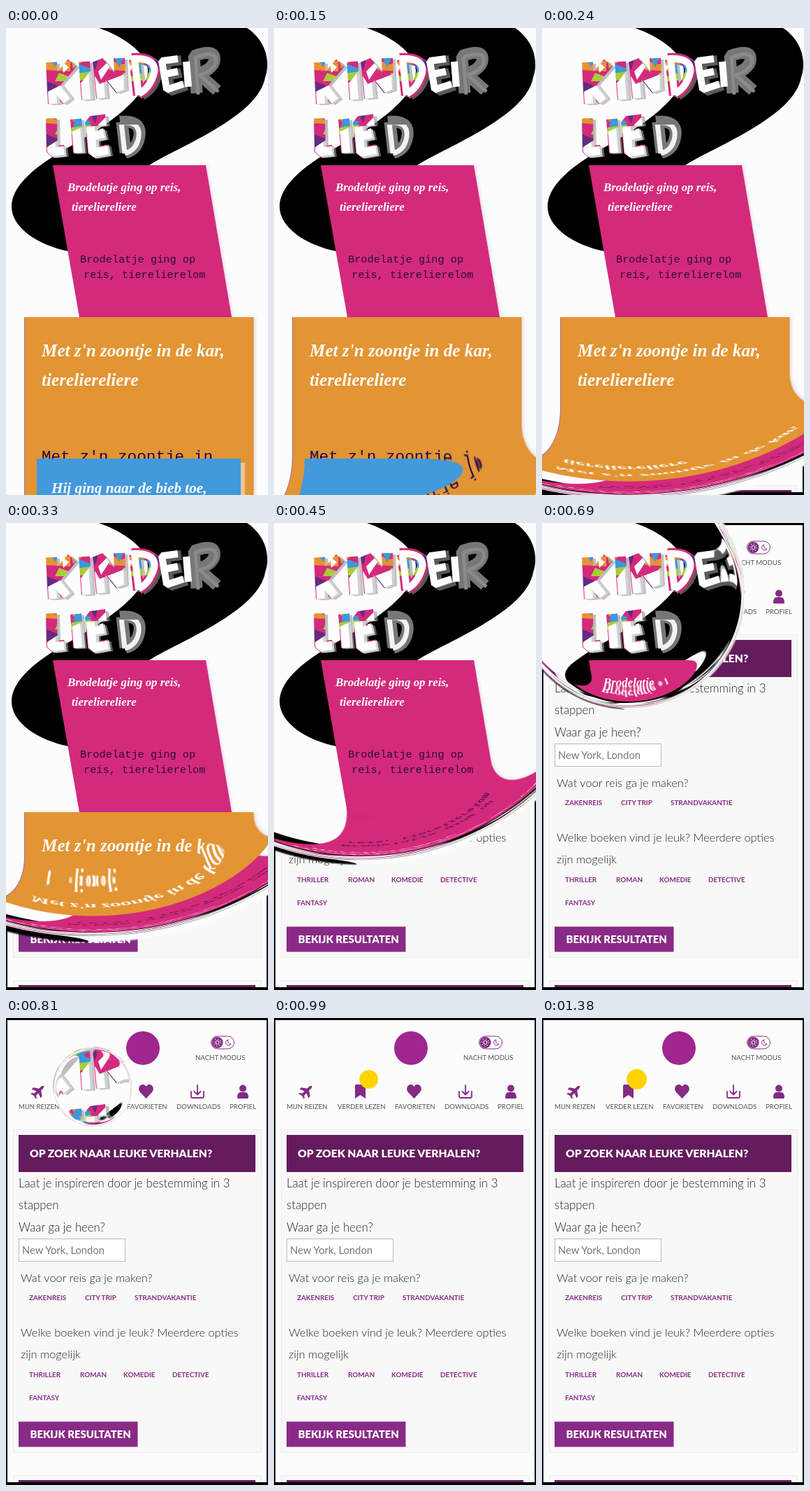
Write an HTML page with a canvas that moves like this. It is 375 by 667 pixels and loops after 8 s.

```html
<!DOCTYPE html>
<html lang="nl">
<head>
<meta charset="utf-8">
<title>Leuke verhalen</title>
<style>
html, body { margin: 0; width: 100%; height: 100%; overflow: hidden; background: #fcfcfc; }
svg, canvas { position: absolute; left: 0; top: 0; width: 375px; height: 667px; }
text { font-family: Lato, sans-serif; fill: #222; }
.body { font-size: 16.4px; font-weight: 300; }
.intro { font-size: 16.8px; font-weight: 300; }
.nav { font-size: 9.6px; fill: #555; }
.tag { font-size: 9.9px; font-weight: 700; fill: #892a86; }
.bold { font-weight: 900; fill: #fff; }
.icon { fill: #842b83; }
.line { fill: none; stroke: #842b83; stroke-width: 1.8; stroke-linecap: round; stroke-linejoin: round; }
</style>
</head>
<body>
<svg viewBox="0 0 375 667">
  <path d="M0 0H375V667H0Z"/>
  <path fill="#fcfcfc" d="M2 3H373V663H2Z"/>

  <circle cx="196" cy="43" r="24" fill="#a0268f"/>
  <rect x="293.5" y="26" width="33" height="18" rx="9" fill="#fff" stroke="#842b83"/>
  <circle class="icon" cx="302.5" cy="35" r="8"/>
  <circle cx="302.5" cy="35" r="2.5" fill="none" stroke="#fff"/>
  <circle cx="302.5" cy="35" r="4.8" fill="none" stroke="#fff" stroke-width="1.5" stroke-dasharray="1 2.77"/>
  <path d="M318 31A4 4 0 1 0 322 37A4 4 0 0 1 318 31Z" fill="none" stroke="#842b83"/>
  <text class="nav" x="271" y="60">NACHT MODUS</text>

  <path class="icon" transform="translate(46 105) rotate(-45)" d="M11 0Q11 -2 8 -2H4L-1 -9H-4L-1.5 -2H-6L-8 -5H-10L-8.5 0L-10 5H-8L-6 2H-1.5L-4 9H-1L4 2H8Q11 2 11 0Z"/>
  <path class="icon" d="M116 97Q116 95 118 95H129Q131 95 131 97V115L123.5 110L116 115Z"/>
  <path class="icon" d="M200.5 115L192 106C188 101 191 95 196 95Q199 95 200.5 98Q202 95 205 95C210 95 213 101 209 106Z"/>
  <path class="line" d="M265 105V112Q265 114 267 114H281Q283 114 283 112V105M274 96V109M269.5 105L274 109.5L278.5 105"/>
  <circle class="icon" cx="339" cy="100.5" r="5"/>
  <path class="icon" d="M331 114Q331 106 336 106H342Q347 106 347 114Q347 115 345 115H333Q331 115 331 114Z"/>
  <text class="nav" x="18" y="130">MIJN REIZEN</text>
  <text class="nav" x="91" y="130">VERDER LEZEN</text>
  <text class="nav" x="173" y="130">FAVORIETEN</text>
  <text class="nav" x="244" y="130">DOWNLOADS</text>
  <text class="nav" x="320" y="130">PROFIEL</text>
  <circle id="badge" cx="135.7" cy="87.5" r="0" fill="#fed400"/>

  <g fill="#f8f8f8" stroke="#ebebeb">
    <rect x="10.5" y="159.5" width="355" height="461"/>
    <path d="M10.5 663V653.5H365.5V663"/>
  </g>
  <path fill="#641b5d" d="M18 167H357V220H18ZM18 660H357V663H18Z"/>
  <text class="bold" x="34" y="198.5" font-size="15.6">OP ZOEK NAAR LEUKE VERHALEN?</text>
  <text class="intro" x="18" y="242">Laat je inspireren door je bestemming in 3</text>
  <text class="intro" x="18" y="273">stappen</text>
  <text class="intro" x="18" y="305">Waar ga je heen?</text>
  <rect x="18.5" y="315.5" width="152" height="32" fill="#fff" stroke="#bbb"/>
  <text x="23" y="336.5" font-size="14.8" style="fill:#777">New York, London</text>
  <text class="body" x="21" y="377">Wat voor reis ga je maken?</text>
  <text class="tag" x="33" y="402.5">ZAKENREIS</text>
  <text class="tag" x="113" y="402.5">CITY TRIP</text>
  <text class="tag" x="184" y="402.5">STRANDVAKANTIE</text>
  <text class="body" x="21" y="454.5">Welke boeken vind je leuk? Meerdere opties</text>
  <text class="body" x="21" y="486">zijn mogelijk</text>
  <text class="tag" x="33" y="513">THRILLER</text>
  <text class="tag" x="106" y="513">ROMAN</text>
  <text class="tag" x="168" y="513">KOMEDIE</text>
  <text class="tag" x="238" y="513">DETECTIVE</text>
  <text class="tag" x="33" y="546">FANTASY</text>
  <path fill="#892a86" d="M18 576.5H188.5V612.5H18Z"/>
  <text class="bold" x="34.5" y="599.5" font-size="14.8">BEKIJK RESULTATEN</text>
</svg>
<canvas id="lens" width="375" height="667"></canvas>

<script>
const W = 375, H = 667, LOOP = 8000, STEP = 30;
const CX = 124, CY = 98;       // the lens closes on the bookmark
const R0 = 806, SPEED = 0.925; // start radius, px per ms
const FLAT = 0.78;             // undistorted share of the radius

function makeCanvas(w, h) {
  const c = Object.assign(document.createElement('canvas'), { width: w, height: h });
  return c.getContext('2d', { willReadFrequently: true });
}

function fill(g, color, d) {
  g.fillStyle = color;
  g.fill(new Path2D(d));
}

function stroke(g, style, width, d, dx = 0, dy = 0) {
  g.save();
  g.translate(dx, dy);
  g.strokeStyle = style;
  g.lineWidth = width;
  g.stroke(new Path2D(d));
  g.restore();
}

function paperCut(g) {
  const p = makeCanvas(92, 76);
  fill(p, '#d42a7c', 'M0 0H92V76H0Z');
  fill(p, '#e8922f', 'M52 44L74 52L92 46V62L56 60ZM0 40L20 46L4 58Z');
  fill(p, '#3d97dc', 'M62 40H78L70 56ZM8 50L30 58L24 70L4 64Z');
  fill(p, '#a9cc3a', 'M2 66L30 62L26 74L0 76ZM76 64L92 70V76H70Z');
  fill(p, '#672a82', 'M58 0L74 6L68 22L54 16ZM28 46L40 44L36 60Z');
  fill(p, '#fff', 'M40 62L54 48L58 53L44 74ZM80 48L90 56L82 64Z');
  return g.createPattern(p.canvas, 'repeat');
}

function drawTitle(g) {
  const K = 'M65 49L68 108M95 50L69 80L88 104', I = 'M112 48L116 102';
  const N = 'M137 100L132 48L164 88L162 43';
  const D = 'M184 45L190 96M180 44Q216 42 212 64Q206 86 190 94';
  const E = 'M246 44L223 47L230 88L254 80M227 66L246 62', I2 = 'M258 48L261 84';
  const R = 'M273 93L269 40Q302 28 298 48Q294 60 275 65L302 89';
  const low = 'M65 129L66 177L84 175M100 130L104 178' +
    'M143 131L121 134L125 178L147 174M123 155L141 151';
  const D2 = 'M166 134L171 178M163 134Q194 131 191 154Q188 174 171 178';
  const paint = K + I + N + low;
  g.lineJoin = 'bevel';
  stroke(g, 'rgba(150,150,150,.6)', 14, K + I + N + D + E + low, 5, 2);
  stroke(g, '#777', 17, R + D2);
  stroke(g, '#8a8a8a', 5, R, 2, 2);
  stroke(g, paperCut(g), 16, paint + D);
  g.save();
  g.clip(new Path2D('M50 96L86 78L108 78L122 60L134 80L170 66L178 30H275V120H50ZM50 176L90 150L108 142L150 138H205V195H50Z'));
  stroke(g, '#d0d0d0', 15, paint, 2, 1);
  stroke(g, '#fff', 12, paint, -1);
  stroke(g, '#fff', 10, D + E + I2);
  stroke(g, '#f2f2f2', 7, D2, -1, 1);
  g.restore();
}

function card(g, color, d) {
  g.save();
  g.shadowColor = 'rgba(60,30,80,.13)';
  g.shadowBlur = 4;
  g.shadowOffsetX = 2;
  fill(g, color, d);
  g.restore();
}

function write(g, font, color, lines) {
  g.font = font;
  g.fillStyle = color;
  for (const [s, x, y] of lines) g.fillText(s, x, y);
}

function drawCover() {
  const g = makeCanvas(W, H);
  const script = px => `italic bold ${px}px "Liberation Serif", serif`;
  const mono = px => `${px}px "Liberation Mono", monospace`;
  fill(g, '#fcfcfc', 'M0 0H375V667H0Z');
  fill(g, '#000', 'M133 0C168 12 202 36 203 60C204 104 132 146 78 177C36 202 8 228 8 255' +
    'C8 285 45 310 90 319L150 300L205 196C250 168 362 126 371 70C379 48 372 18 345 0Z');
  drawTitle(g);

  card(g, '#d42a7c', 'M67 196H286L323 413H105Z');
  write(g, script(16.9), '#fff', [['Brodelatje ging op reis,', 88, 233], ['tiereliereliere', 94, 261]]);
  write(g, mono(15.3), '#2a0a38', [['Brodelatje ging op', 106, 335], ['reis, tierelierelom', 111, 357]]);

  card(g, '#e39433', 'M26 413H354.500V680H26Z');
  fill(g, '#b06aa0', 'M26 413H27V667H26Z');
  write(g, script(25.2), '#fff', [["Met z'n zoontje in de kar,", 51, 469], ['tiereliereliere', 51, 511]]);
  write(g, mono(22.7), '#1d0a4a', [["Met z'n zoontje in", 51, 619]]);

  fill(g, 'rgba(240,225,225,.6)', 'M50 621H342V667H50Z');
  fill(g, '#4299dc', 'M44 615H336V667H44Z');
  write(g, script(21.2), '#fff', [['Hij ging naar de bieb toe,', 65, 664]]);
  return g.getImageData(0, 0, W, H).data;
}

const cover = drawCover();
const lens = document.getElementById('lens').getContext('2d');
const badge = document.getElementById('badge');
const view = lens.createImageData(W, H);
const out = view.data;

// Adds one bilinear sample of the cover to sum.
function sample(x, y, sum) {
  x = Math.min(Math.max(x, 0), W - 1.001);
  y = Math.min(Math.max(y, 0), H - 1.001);
  const x0 = x | 0, y0 = y | 0, fx = x - x0, fy = y - y0;
  const i = (y0 * W + x0) * 4, j = i + W * 4;
  for (let c = 0; c < 3; c++) {
    const top = cover[i + c] * (1 - fx) + cover[i + 4 + c] * fx;
    const bottom = cover[j + c] * (1 - fx) + cover[j + 4 + c] * fx;
    sum[c] += top * (1 - fy) + bottom * fy;
  }
}

// Glass rim: light bends towards the centre and, at the very edge, past it.
function bend(d, r) {
  const x = Math.min(Math.max((d / r - FLAT) / (1 - FLAT), 0), 0.98);
  return d - r * 0.52 * x * x / Math.sqrt(1 - x * x);
}

function drawLens(r) {
  const sum = [0, 0, 0];
  for (let y = 0, i = 0; y < H; y++) {
    for (let x = 0; x < W; x++, i += 4) {
      const dx = x - CX, dy = y - CY, d = Math.hypot(dx, dy);
      if (d > r + 1) {
        out[i + 3] = 0;
        continue;
      }
      out[i + 3] = 255 * Math.min(1, (r - d + 1) / 3);
      if (d <= r * FLAT) {
        for (let c = 0; c < 3; c++) out[i + c] = cover[i + c];
        continue;
      }
      const n = d > r * 0.88 ? 5 : 1;
      sum.fill(0);
      for (let k = 0; k < n; k++) {
        const q = bend(d + (k + 0.5) / n - 0.5, r) / d;
        sample(CX + dx * q, CY + dy * q, sum);
      }
      for (let c = 0; c < 3; c++) out[i + c] = sum[c] / n;
    }
  }
  lens.putImageData(view, 0, 0);
}

function draw(t) {
  const r = R0 - SPEED * t;
  if (r > 2) drawLens(r);
  else lens.clearRect(0, 0, W, H);
  const p = Math.min(Math.max((t - 810) / 570, 0), 1);
  badge.setAttribute('r', 14.4 * (1 - 2 ** (-12 * p)));
}

let start, last = -1;
function tick(now) {
  start ??= now;
  const t = Math.floor((now - start) % LOOP / STEP) * STEP;
  if (t !== last) draw(last = t);
  requestAnimationFrame(tick);
}
draw(0);
requestAnimationFrame(tick);
</script>
</body>
</html>
```
